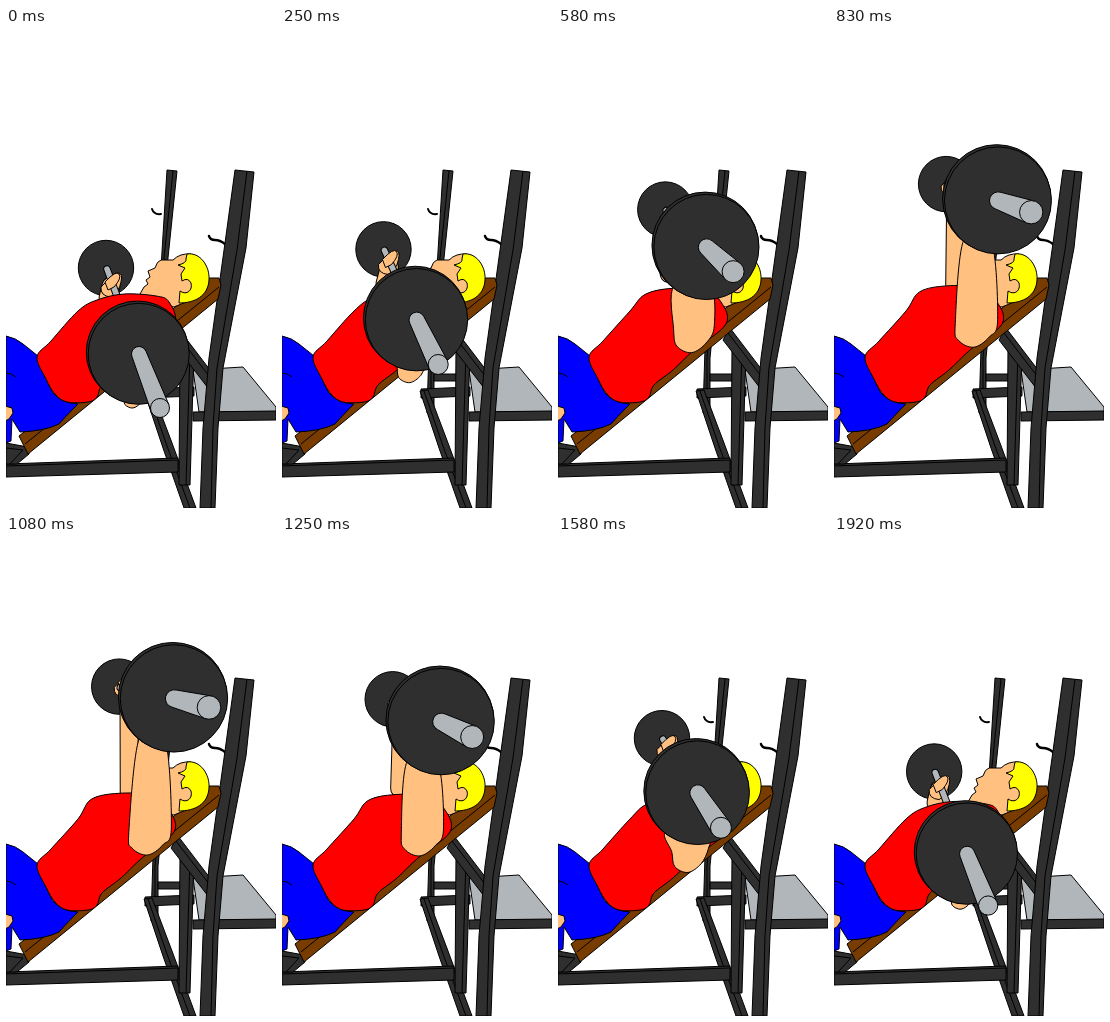
These frames come from a looping animation (270x480 px, 2010 ms). An HTML page:

```html
<!DOCTYPE html>
<html lang="en">
<head>
<meta charset="utf-8">
<title>Incline bench press</title>
<style>
html, body { margin: 0; width: 100%; height: 100%; overflow: hidden; background: #fff; }
svg { display: block; width: 100vw; height: 100vh; }
.ink { stroke: #000; stroke-width: 1; stroke-linejoin: round; }
.steel { fill: #2f2f2f; }
.grey { fill: #b0b6b9; }
.skin { fill: #ffc080; }
.line { fill: none; }
.round { fill: none; stroke-linecap: round; }
</style>
</head>
<body>
<svg viewBox="0 0 270 480">
  <g class="ink steel">
    <path d="M161 142 171 143 162 230 152 330 152 385 145 385 147 320 155 240Z"/>
    <path class="line" d="M167 143 158 230 149 330V385"/>
    <path class="round" d="M146 181Q148 187 155 186" stroke-width="2"/>
    <path d="M152 346H176V353H152Z"/>
    <path d="M139 361 188 359V368L139 370Z"/>
    <path d="M138 363 146 362 166 415 190 480H178L157 420Z"/>
    <path class="line" d="M142 363 161 418 184 480"/>
    <path class="grey" d="M187 342 237 339 270 379V384H193Z"/>
    <path d="M187 384 270 383V392L187 393Z"/>
    <path d="M0 436 172 430V444L0 449Z"/>
    <path class="line" d="M0 438 172 432"/>
    <path d="M0 415 22 419 23 426 11 436H0Z"/>
    <path class="line" d="M0 420 17 422 4 436"/>
    <path d="M174 318 188 322 184 457H173Z"/>
    <path class="line" d="M184 322 180 457"/>
    <path d="M172 300 204 342 202 360 165 312Z"/>
    <path class="line" d="M170 305 203 348"/>
    <path class="round" d="M203 208Q204 212 209 212T219 216" stroke-width="2.5"/>
    <path d="M229 142 248 144 240 220 217 340 212 400 209 480H194L197 400 203 330 219 215Z"/>
    <path class="line" d="M241 143 231 222 211 340 207 400 205 480"/>
    <path d="M203 250H213L215 257 212 271 22 426 13 408 90 347Z" fill="#783c00"/>
    <path class="line" d="M213 259 19 416"/>
  </g>
  <g class="ink">
    <path class="skin" d="M185 226Q174 225 167 232L155 232Q151 233 149 240L142 243 144 249 140 252 142 256 138 259 134 266 150 276 168 279 180 274 190 250Z"/>
    <path d="M181 226C194 224 204 238 203 252C202 268 189 275 173 275L174 263C181 268 187 262 185 255Q182 249 176 253L175 246 179 240 172 237Q181 235 180 231Z" fill="#ff0"/>
    <path d="M0 308Q10 310 17 316L32 328Q38 350 47 365 55 375 72 376 60 388 53 396 39 403 14 404L6 391 5 413 0 415Z" fill="#00f"/>
    <path class="line" d="M0 345 5 346 10 349"/>
    <path class="skin" d="M-1 378 6 380 7 385 3 391-1 393Z"/>
  </g>
  <g class="ink">
    <circle id="rear" class="steel" r="27.7"/>
    <path id="farArmEdge" class="round" stroke-width="19"/>
    <path id="farArm" class="round" style="stroke:#ffc080" stroke-width="17"/>
    <path id="hand" class="skin" d="M0 14Q7 5 12 5T15 14Q13 24 5 29Q-6 28-5 19Z"/>
    <path id="barEdge" class="round" stroke-width="7.5"/>
    <path id="bar" class="round" style="stroke:#b0b6b9" stroke-width="5.5"/>
    <path id="fingers" class="skin" d="M-1 14Q10 2 13 6T8 19L2 22Z"/>
    <path id="shirt" fill="#f00"/>
    <path id="nearArm" class="skin"/>
    <circle id="plateBack" class="steel"/>
    <circle id="plate" class="steel"/>
    <path id="sleeve" class="grey"/>
    <circle id="cap" class="grey"/>
  </g>
</svg>
<script>
const LOOP = 2010, STEPS = 24;
const set = (id, attrs) => {
  for (const k in attrs) document.getElementById(id).setAttribute(k, attrs[k]);
};

// Closed smooth curve through the points.
function blob(pts) {
  const at = i => pts[(i + pts.length) % pts.length];
  const handle = (p, from, to) => p.map((v, k) => v + (to[k] - from[k]) / 6);
  const arcs = pts.map((p, i) =>
    `C${handle(p, at(i - 1), at(i + 1))} ${handle(at(i + 1), at(i + 2), p)} ${at(i + 1)}`);
  return `M${pts[0]}${arcs.join("")}Z`;
}

// Height of the lift for u from 0 (chest) to 1 (top).
const ease = u => .4 * u + .3 * (1 - Math.cos(Math.PI * u)) + .018 * Math.sin(Math.PI * u);

function drawRearSide(e, fx, fy) {
  const x = 100 + 14 * e ** 1.4, y = 240 - 93 * e;
  const elbow = [102 + 23 * e ** 2, 270 - 8 * e - 21 * Math.sin(Math.PI * e)];
  const arm = `M${x + 5 + 5 * e} ${y + 18}L${elbow}`;
  const bar = `M${x + 1} ${y + 1}L${fx} ${fy}`;
  const grip = `translate(${x} ${y - 19 * e})`;
  set("rear", { cx: x, cy: y });
  set("farArmEdge", { d: arm });
  set("farArm", { d: arm });
  set("barEdge", { d: bar });
  set("bar", { d: bar });
  set("hand", { transform: grip });
  set("fingers", { transform: grip });
}

function drawShirt(e) {
  const raised = (x, y) => [x - 6 * e, y - 9 * e];
  set("shirt", { d: blob([[31, 329], [45, 313], [72, 283], raised(91, 272), raised(118, 266),
    raised(150, 268), [163, 274], [168, 296], [136, 322], [115, 342], [96, 357], [91, 369],
    [82, 374], [61, 374], [49, 366], [40, 351]]) });
}

function drawNearArm(e, fx, fy) {
  const drop = (1 - e) ** 2.4;
  const x = 126 + 15 * e ** 2, y = 302 + 69 * drop, r = 17 - 8 * drop;
  const wristX = fx - 22 * e, wristY = fy + 40, half = 28 - 16 * e;
  set("nearArm", { d: blob([
    [wristX - half, wristY], [x - r, y - r * .4], [x - r * .8, y + r * .6], [x + r * .1, y + r],
    [x + r, y + r * .4], [x + r * 1.5, y - r * .65], [wristX + half, wristY]
  ]) });
}

function drawFrontPlate(e, fx, fy) {
  const r = 51.2 + 3.3 * e;
  set("plateBack", { cx: fx - .5, cy: fy - .8, r });
  set("plate", { cx: fx + .7, cy: fy + .8, r: r - .7 });

  const cx = fx + 22 + 15 * e ** 2.2, cy = fy + 55 - 47 * e, capR = 9.5 + 2.4 * e;
  const sx = fx + 1, sy = fy + 1, w = 7.5 + 1.4 * e;
  const a = Math.atan2(cy - sy, cx - sx), nx = -Math.sin(a), ny = Math.cos(a);
  set("sleeve", { d: `M${cx + nx * capR} ${cy + ny * capR}L${sx + nx * w} ${sy + ny * w}` +
    `A${w} ${w} 0 0 1 ${sx - nx * w} ${sy - ny * w}L${cx - nx * capR} ${cy - ny * capR}Z` });
  set("cap", { cx, cy, r: capR });
}

function draw(u) {
  const e = ease(u), fx = 132 + 38 * e ** 1.9, fy = 325 - 170 * e;
  drawRearSide(e, fx, fy);
  drawShirt(e);
  drawNearArm(e, fx, fy);
  drawFrontPlate(e, fx, fy);
}

const startOf = step => Math.round(step * 25 / 3) * 10;

function tick(now) {
  const t = now % LOOP;
  let step = STEPS - 1;
  while (step > 0 && startOf(step) > t) step--;
  draw(Math.min(step, STEPS - step) * 2 / STEPS);
  requestAnimationFrame(tick);
}
draw(0);
requestAnimationFrame(tick);
</script>
</body>
</html>
```
